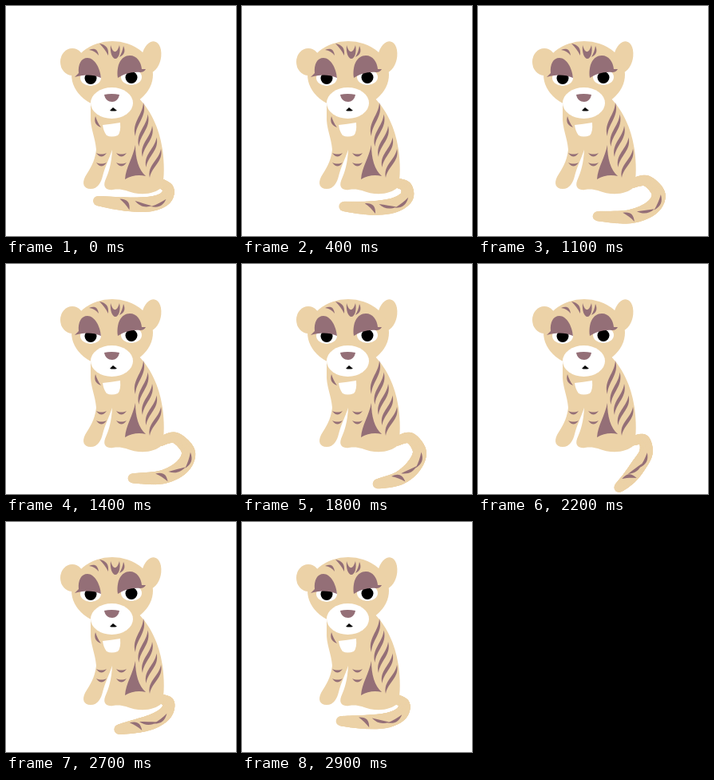
Recreate the animation shown at these times as an HTML page with a canvas. Size 288 by 288 pixels, loop 3 s.

```html
<!DOCTYPE html>
<html>
<head>
<meta charset="utf-8">
<title>Tiger cub swinging its tail</title>
<style>
html, body { margin: 0; width: 100%; height: 100%; overflow: hidden; background: #fff; }
canvas { display: block; width: 288px; height: 288px; }
</style>
</head>
<body>
<canvas id="stage" width="288" height="288"></canvas>
<script>
const ctx = document.getElementById('stage').getContext('2d');
const FUR = '#ecd2a7', MAUVE = '#946f77', LOOP = 3000, STEP = 100;

// Tail spine from root to tip: resting points and how far each swings and bulges
const REST  = [[192, 221], [203, 229], [199, 241], [180, 248], [149, 248], [115, 244]];
const SWING = [[1, 0], [0, -5], [-4, -3], [2, 3], [27, 16], [60, 36]];
const BULGE = [[1, 1], [9, -8], [32, -4], [39, 4], [28, 8], [3, 0]];

function fill(color, path) {
  ctx.fillStyle = color;
  ctx.fill(new Path2D(path));
}

function ellipse(color, x, y, rx, ry, turn = 0) {
  ctx.fillStyle = color;
  ctx.beginPath();
  ctx.ellipse(x, y, rx, ry, turn, 0, 7);
  ctx.fill();
}

// Crescent between two points; wave gives it an S shape
function stripe(x0, y0, x1, y1, bend, thick, wave = 0) {
  const dx = x1 - x0, dy = y1 - y0, len = Math.hypot(dx, dy);
  const at = (k, b) => [x0 + dx * k - dy / len * b, y0 + dy * k + dx / len * b];
  const outer = bend + thick;
  ctx.fillStyle = MAUVE;
  ctx.beginPath();
  ctx.moveTo(x0, y0);
  ctx.bezierCurveTo(...at(.35, bend + wave), ...at(.65, bend - wave), x1, y1);
  ctx.bezierCurveTo(...at(.65, outer - wave), ...at(.35, outer + wave), x0, y0);
  ctx.fill();
}

function spineAt(t) {
  const swing = Math.min(1, t / .69, (1 - t) / .23);
  const bulge = Math.sin(Math.PI * t ** .9) ** 2;
  return REST.map((p, i) => p.map((v, k) => v + swing * SWING[i][k] + bulge * BULGE[i][k]));
}

// Catmull-Rom point, u from 0 to 1
function along(pts, u) {
  const last = pts.length - 1;
  const i = Math.min(last - 1, Math.floor(u * last)), f = u * last - i;
  return [0, 1].map(axis => {
    const [a, b, c, d] = [-1, 0, 1, 2].map(o => pts[Math.max(0, Math.min(last, i + o))][axis]);
    return b + f / 2 * (c - a + f * (2*a - 5*b + 4*c - d + f * (3*b - a - 3*c + d)));
  });
}

function tailStripe(pts, u, ...shape) {
  const [x, y] = along(pts, u), [px, py] = along(pts, u - .02), [qx, qy] = along(pts, u + .02);
  ctx.save();
  ctx.translate(x, y);
  ctx.rotate(Math.atan2(qy - py, qx - px));
  stripe(...shape);
  ctx.restore();
}

function drawTail(t) {
  const pts = spineAt(t);
  for (let i = 0; i <= 120; i++) {
    const u = i / 120, r = 6 + 3.4 * Math.sin(Math.PI * u ** 1.5);
    ellipse(FUR, ...along(pts, u), r, r);
  }
  tailStripe(pts, .8, 7, 6, -6, -7, -1, -6);
  tailStripe(pts, .66, 10, 5, -11, -2, 0, 5);
  tailStripe(pts, .5, 11, -2, -10, 0, 1, 5);
}

function drawBody() {
  fill(FUR, 'M106 115V137C105 152 112 165 113 180C111 196 105 204 99 214C95 222 97 229 106 229C115 229 119 221 121 213C124 201 129 192 133 180C132 198 129 207 124 219C121 228 127 231 134 230C142 229 145 230 150 231C167 238 186 236 195 227C199 216 198 195 196 180C193 160 185 133 163 112Z');
  fill('#fff', 'M121 149Q131 148 143 146Q144 158 140 162Q132 165 126 162Q122 157 121 149Z');
  fill(MAUVE, 'M162 174C162 191 166 205 175 213Q161 210 149 217C150 202 159 190 162 174Z');
  stripe(112, 138, 119, 152, 1, 4);
  for (const x of [113, 138])
    for (const y of [184, 196]) stripe(x, y, x + 13, y, 2, 4);
  for (let i = 0; i < 5; i++)
    stripe(172 + 5.5 * i, 121 + 14.5 * i, 162 + 4.5 * i, 163 + 13 * i, -3, 6, -6);
}

function drawEye(x, y) {
  ellipse('#fff', x, y, 13, 10);
  ellipse('#000', x, y + .5, 7.5, 7.5);
}

function drawHead() {
  ellipse(FUR, 83, 70, 15, 17);
  ellipse(FUR, 182, 64, 12, 20, .2);
  ellipse(FUR, 133, 86, 51, 42);
  stripe(104, 55, 116, 62, -2, -4);
  stripe(117, 47, 128, 62, -1, -5);
  fill(MAUVE, 'M131 49C134 60 139 60 142 49C144 58 141 66 137 66C133 66 130 58 131 49Z');
  stripe(147, 50, 142, 64, -1, -4);

  drawEye(106, 90);
  drawEye(157, 89);
  fill(MAUVE, 'M86 89L91 84C90 73 94 65 102 65C111 65 118 78 119 90C108 85 96 86 86 89Z');
  fill(MAUVE, 'M140 90C138 74 144 62 155 62C164 62 169 70 170 79L175 79Q173 83 168 83C157 82 148 85 140 90Z');

  ellipse('#fff', 132.5, 121.5, 26.5, 19.5);
  fill(MAUVE, 'M123 111Q132 109 142 111C141 117 137 120 133 120C128 120 124 117 123 111Z');
  fill('#000', 'M134 127L139 131Q134 132 130 131Z');
}

function frame() {
  const time = Math.floor(performance.now() % LOOP / STEP) * STEP;
  ctx.fillStyle = '#fff';
  ctx.fillRect(0, 0, 288, 288);
  drawTail(time / LOOP);
  drawBody();
  drawHead();
  requestAnimationFrame(frame);
}
frame();
</script>
</body>
</html>
```
